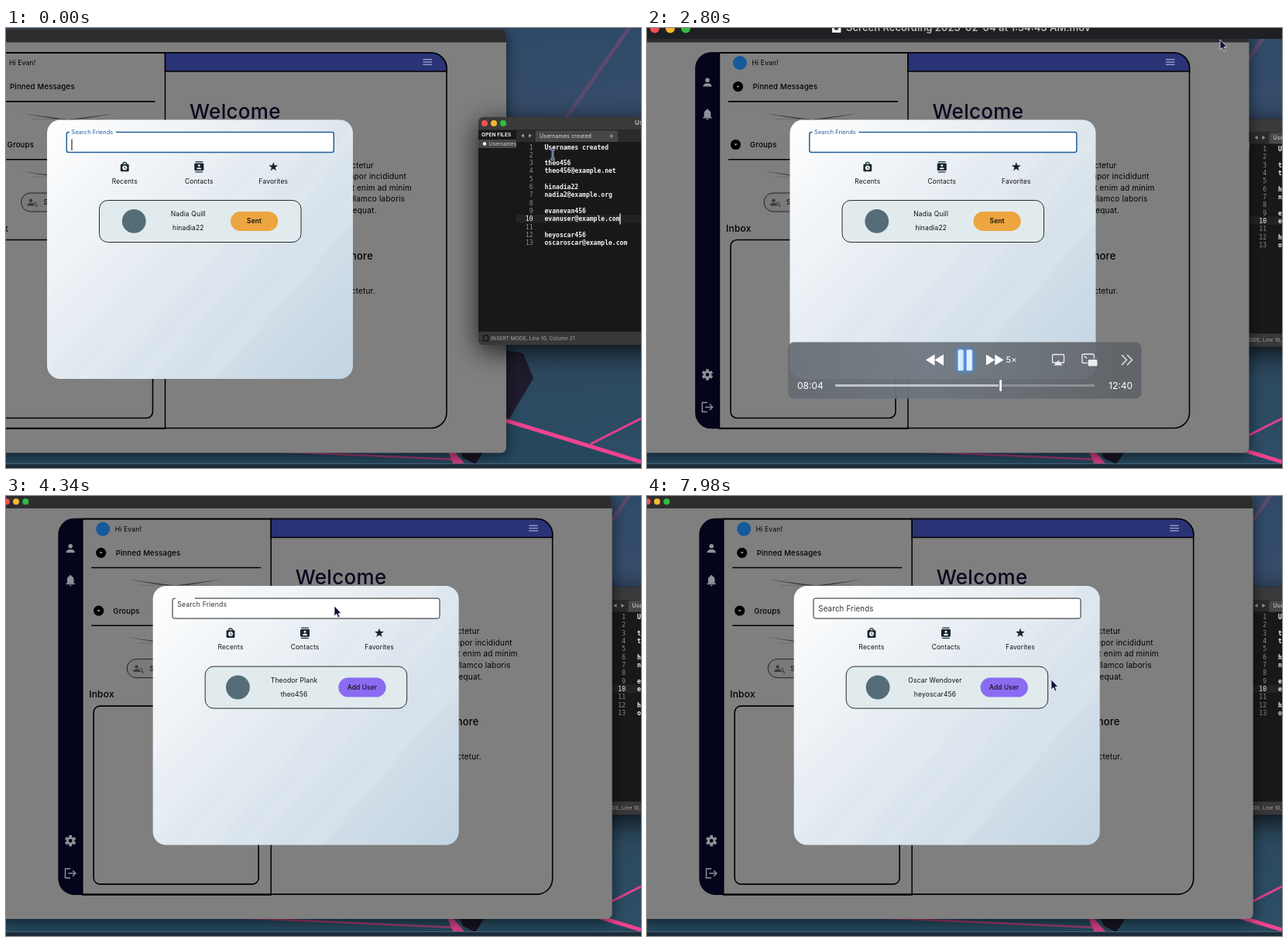
An HTML page with a canvas for the animation above (8000 ms loop, 820 by 568 pixels).

```html
<!DOCTYPE html>
<html lang="en">
<head>
<meta charset="utf-8">
<title>Friend search recording</title>
<style>
html, body { margin: 0; width: 100%; height: 100%; overflow: hidden; background: #2d475f; }
canvas { display: block; }
</style>
</head>
<body>
<canvas id="stage" width="820" height="568"></canvas>
<script>
const c = document.getElementById('stage').getContext('2d');
const LOOP = 8000, STEP = 70;
const UI = 'Inter, Roboto, sans-serif', MONO = '"DejaVu Sans Mono", monospace';
const LIGHTS = ['#f8504d', '#f5b731', '#2fbe43'];

const NADIA = { name: 'Nadia Quill', id: 'hinadia22' };
const THEO = { name: 'Theodor Plank', id: 'theo456' };
const OSCAR = { name: 'Oscar Wendover', id: 'heyoscar456' };

// Each search: field focus, first key, enter, press on "Add User"
const SEARCHES = [
  { user: THEO, focus: -500, type: 3600, enter: 4270, send: 4690 },
  { user: NADIA, focus: 5110, type: 5410, enter: 5950, send: 6510 },
  { user: OSCAR, focus: 6930, type: 7070, enter: 7770, send: Infinity }
];
const NOTES = ['Usernames created', '', THEO.id, 'theo456@example.net', '', NADIA.id, 'nadia2@example.org', '',
  'evanevan456', 'evanuser@example.com', '', OSCAR.id, 'oscaroscar@example.com'];

// Moves: start time, end time, x, y
const GRIP = [608.5, 15], FIELD = [297, 149], BUTTON = [462, 247];
const DRAG = [[2380, 2800, 131.5, 0], [2800, 3080, 146, -17.5], [3080, 3290, 136.7, -2.4]];
const POINTER = [
  [770, 1330, 612, 135], [1400, 1610, 731.5, 137.5], [1610, 2310, ...GRIP],
  ...DRAG.map(([a, b, x, y]) => [a, b, GRIP[0] + x, GRIP[1] + y]),
  [3290, 3500, 424, 142],
  ...SEARCHES.slice(0, 2).flatMap(({ enter, send }, i) =>
    [[enter + 70, send - 70, ...BUTTON], [send + 70, SEARCHES[i + 1].focus, ...FIELD]]),
  [7700, 7980, 522, 237]
];

const clamp = v => Math.max(0, Math.min(1, v));
const span = (t, a, b) => clamp((t - a) / (b - a));
const ease = u => u * u * (3 - 2 * u);

function glide(t, [x, y], moves) {
  for (const [a, b, toX, toY] of moves) {
    const k = ease(span(t, a, b));
    x += (toX - x) * k;
    y += (toY - y) * k;
  }
  return [x, y];
}

function paint(fill, stroke, width = 1) {
  if (fill) { c.fillStyle = fill; c.fill(); }
  if (stroke) { c.strokeStyle = stroke; c.lineWidth = width; c.stroke(); }
}
function box(x, y, w, h, r, fill, stroke, width) {
  c.beginPath(); c.roundRect(x, y, w, h, r); paint(fill, stroke, width);
}
function disc(x, y, r, fill, stroke, width) {
  c.beginPath(); c.arc(x, y, r, 0, 7); paint(fill, stroke, width);
}
function poly(points, fill, stroke, width) {
  c.beginPath();
  for (let i = 0; i < points.length; i += 2) c.lineTo(points[i], points[i + 1]);
  if (fill) c.closePath();
  paint(fill, stroke, width);
}
function line(x1, y1, x2, y2, color, width) {
  poly([x1, y1, x2, y2], null, color, width);
}
function text(s, x, y, size, color, { weight = 400, align = 'left', font = UI, gap = .018 } = {}) {
  c.font = `${weight} ${size}px ${font}`;
  c.letterSpacing = size * gap + 'px';
  c.textAlign = align;
  c.fillStyle = color;
  c.fillText(s, x, y + size * .36);
}
function shadow(blur, alpha, y = 0) {
  c.shadowBlur = blur; c.shadowColor = `rgba(0,0,0,${alpha})`; c.shadowOffsetY = y;
}
function at(x, y, scale, drawing) {
  c.save(); c.translate(x, y); c.scale(scale, scale); drawing(); c.restore();
}
const lights = (x, y, gap, r) => LIGHTS.forEach((color, i) => disc(x + gap * i, y, r, color));

// Icons are drawn around 0,0 about 20 units wide
const person = color => () => {
  disc(0, -4, 4, color);
  box(-8, 2, 16, 6, [7, 7, 0, 0], color);
};
const bell = color => () => {
  box(-6, -8, 12, 13, [6, 6, 0, 0], color);
  box(-8, 5, 16, 2, 0, color);
  disc(0, -8, 1.7, color);
  box(-2, 8, 4, 2, [0, 0, 2, 2], color);
};
const logout = color => () => {
  poly([0, -8, -9, -8, -9, 8, 0, 8], null, color, 2);
  line(-4, 0, 8, 0, color, 2);
  poly([4, -5, 9, 0, 4, 5], null, color, 2);
};
const gear = color => () => {
  disc(0, 0, 5.2, null, color, 4);
  for (let i = 0; i < 6; i++) {
    c.rotate(Math.PI / 3);
    box(-2.5, -9.8, 5, 4, .5, color);
  }
};
const recents = color => () => {
  box(-4, -10, 8, 8, 4, null, color, 2);
  box(-9, -6, 18, 16, 2, color);
  disc(0, 2, 5, '#f3f6f8');
  poly([0, -1, 0, 2.3, 2.4, 4], null, color, 1.6);
};
const contacts = color => () => {
  box(-8, -12, 16, 2, 0, color);
  box(-8, 10, 16, 2, 0, color);
  box(-10, -8, 20, 16, 2, color);
  disc(0, -2.8, 2.4, '#f3f6f8');
  box(-5, 1.5, 10, 3.5, [4, 4, 0, 0], '#f3f6f8');
};
const star = color => () => {
  const points = [];
  for (let i = 0; i < 10; i++) {
    const r = i % 2 ? 4.2 : 10.4, a = i * Math.PI / 5;
    points.push(r * Math.sin(a), -r * Math.cos(a));
  }
  poly(points, color);
};

function desktop() {
  const g = c.createLinearGradient(700, 0, 760, 568);
  g.addColorStop(0, '#2e4a68'); g.addColorStop(.25, '#384d6c');
  g.addColorStop(.72, '#2b475c'); g.addColorStop(1, '#2d4e66');
  box(0, 0, 820, 568, 0, g);
  line(808, -5, 722, 118, '#5b4a6e', 5);
  poly([640, 415, 668, 420, 681, 452, 646, 511], '#201b2d');
  poly([0, 520, 646, 508, 820, 560, 820, 568, 0, 568], '#25485d');
  line(0, 531, 580, 557, '#a03a72', 2.5);
  line(755, 537, 820, 504, '#e0418b', 3);
  line(640, 505, 820, 560, '#f0438f', 5);
  poly([564, 530, 578, 564, 592, 562], '#d53f83');
  poly([580, 530, 628, 530, 606, 563, 590, 555], '#17131f');
}

function editor() {
  shadow(34, .8, 8);
  box(610, 115, 330, 294, 7, '#181818');
  shadow(0, 0);
  box(610, 115, 330, 16.5, [7, 7, 0, 0], '#3a3a3c');
  lights(618, 123, 12, 4);
  text('Usernames created', 812, 122.5, 8, '#c4c4c4', { weight: 600 });
  box(659, 131.5, 290, 15.5, 0, '#2b2b2c');
  box(684, 132.5, 106, 14.5, [3, 3, 0, 0], '#474748');
  for (const side of [-1, 1]) {
    const x = 672 + side * 3;
    poly([x, 136.5, x, 141.5, x + side * 4, 139], '#999');
  }
  text('Usernames created', 689, 139.3, 7, '#ddd');
  disc(782, 139.5, 2, '#888');
  text('OPEN FILES', 614, 137.6, 6.5, '#eee', { weight: 700 });
  box(610, 144, 49, 11, 0, '#454546');
  disc(618, 149.5, 2.2, '#fff');
  text('Usernames', 623.5, 149.5, 6.6, '#ccc', { gap: 0 });
  box(659, 241, 290, 10.4, 0, '#232323');
  NOTES.forEach((note, i) => {
    const y = 153.6 + i * 10.33, mono = { font: MONO, gap: 0 };
    text(i + 1, 680.5, y, 8.07, i == 9 ? '#fff' : '#8d8d8a', { ...mono, align: 'right' });
    text(note, 695.5, y, 8.07, '#f4f4f4', { ...mono, weight: 700 });
  });
  box(792.4, 239.5, 1.2, 14, 0, '#fff');
  box(610, 392, 330, 17, [0, 0, 7, 7], '#38383a');
  box(616.5, 397, 6, 7, 1, null, '#151515', 1.5);
  text('INSERT MODE, Line 10, Column 21', 626, 400.5, 6.5, '#aaa');
}

function section(label, x, y, labelX) {
  disc(x, y, 6.6, '#000');
  poly([x - 2.2, y - 1, x + 2.2, y - 1, x, y + 1.4], '#999');
  text(label, labelX, y, 9.6, '#000', { weight: 500 });
  line(-26.5, y + 19.2, 192.5, y + 19.2, '#000', 1.6);
  for (const side of [-1, 1]) {
    poly([81 + side * 61, y + 34.5, 81 + side * 2, y + 42, 81, y + 44.5], '#383838');
  }
  line(34, y + 42, 128, y + 42, '#686868', .8);
}

function sidePanel() {
  const pale = '#909097';
  box(-68.5, 31.5, 31, 485.5, [20, 0, 0, 20], '#04041d');
  at(-53.5, 70, .7, person(pale));
  at(-53.5, 111.5, .72, bell(pale));
  at(-53.5, 447.5, .74, gear(pale));
  at(-53.5, 489.5, .74, logout(pale));
  box(-38, 32, 243.5, 485.3, 0, null, '#000', 1.5);
  disc(-11.5, 45, 9, '#155a9b');
  text('Hi Evan!', 4, 45, 8.6, '#000');
  section('Pinned Messages', -14, 75.7, 5);
  section('Groups', -17, 150.5, 1.6);
  box(19.5, 213, 140, 24, 12, '#7a7a7a', '#222');
  at(32, 225, .55, person('#3a3a3a'));
  disc(37.5, 227, 2, '#7a7a7a', '#3a3a3a');
  line(39, 228.5, 41, 231, '#3a3a3a', 1.2);
  text('Search', 48.5, 225, 9, '#111', { weight: 500 });
  text('Inbox', -29.5, 258.5, 12, '#000', { weight: 500 });
  box(-23.5, 273.5, 213, 230, 8, null, '#000', 1.6);
}

function page() {
  shadow(18, .6, 3);
  box(-145, 1.5, 791, 547, 7, '#7f7f7f');
  shadow(0, 0);
  box(-145, 1.5, 791, 17, [7, 7, 0, 0], '#2d2d2f');
  lights(-136, 9.7, 12.3, 4);
  box(-68.5, 32, 637.5, 484.5, 20, null, '#000', 1.6);
  sidePanel();
  box(205.5, 32, 363.5, 24, [0, 20, 0, 0], '#293376', '#000', 1.5);
  for (let i = 0; i < 3; i++) box(538.5, 40 + i * 3.3, 11.5, 1.3, 0, '#a1a5c9');
  text('Welcome', 237, 107.2, 26, '#080820', { weight: 500, gap: .012 });
  const right = { align: 'right' };
  [['amet, consectetur', 475], ['eiusmod tempor incididunt', 517], ['aliqua. Ut enim ad minim', 524],
    ['nostrud exercitation ullamco laboris', 515], ['ea commodo consequat.', 478.5]]
    .forEach(([s, x], i) => text(s, x, 177 + i * 14.6, 10, '#000', right));
  text('Learn more', 474, 294, 13, '#000', { ...right, weight: 500 });
  text('amet, consectetur.', 477, 339, 10, '#000', right);
}

function searchField(t) {
  const { user, focus, type, enter } = SEARCHES.filter(s => t >= s.focus).pop();
  const focused = t < enter;
  const lift = focused ? span(t, focus - 70, focus + 50) : 1 - span(t, enter, enter + 120);
  const pace = (enter - 70 - type) / user.id.length;
  const typed = focused ? user.id.slice(0, Math.max(0, Math.ceil((t - type) / pace))) : '';
  const blue = '#235f99';
  box(78.3, 134.5, 345, 26, 2.5, '#fff', focused ? blue : '#222', focused ? 1.5 : 1);
  if (lift > 0) box(82, 133, 60 * lift, 3, 0, '#f9fbfc');
  if (!typed || lift > .9) {
    text('Search Friends', 84.6, 147.7 - 13.6 * lift, 9.7 - 2.4 * lift, focused ? blue : '#333');
  }
  text(typed, 84.7, 151.8, 9.7, '#000');
  if (focused && (t < 280 || t > 3300)) box(84.5 + c.measureText(typed).width, 143.5, 1, 14.5, 0, '#000');
}

function resultRow(t) {
  const last = SEARCHES.filter(s => t >= s.enter).pop() || { user: NADIA, send: 0 };
  const { name, id } = last.user, sent = t >= last.send, mid = { align: 'center' };
  // Longer names push the avatar and the button outwards
  const push = (name.length - 11) * 1.3;
  const left = 290 + push;
  box(120.5, 222.5, 260.5, 54, 11, '#e1ebed', '#2a2a2a');
  disc(165.3 - push, 249.4, 15.4, '#546d78');
  text(name, 235.3, 240.3, 8.5, '#111', mid);
  text(id, 235.3, 258.3, 8.5, '#111', mid);
  box(left, 237, 61.3, 25, 12.5, sent ? '#eda53f' : '#8a6cf3');
  text(sent ? 'Sent' : 'Add User', left + 30.6, 249.4, 8.4, '#111', { ...mid, weight: sent ? 600 : 500 });
}

function dialog(t) {
  const g = c.createLinearGradient(68, 104, 433, 468);
  g.addColorStop(0, '#ffffff'); g.addColorStop(.5, '#e0e8ef'); g.addColorStop(1, '#c2d4e2');
  box(53, 118.5, 395, 334.5, 17, g);
  c.save();
  c.clip();
  for (let i = 0; i < 5; i++) {
    const x = i * 75 - 60, w = 22 + i % 3 * 10;
    poly([x, 453, x + w, 453, x + w + 290, 118, x + 290, 118], 'rgba(255,255,255,.08)');
  }
  c.restore();
  searchField(t);
  [[recents, 'Recents'], [contacts, 'Contacts'], [star, 'Favorites']].forEach(([icon, label], i) => {
    const x = 153.3 + i * 96;
    at(x, 179.3, .6, icon('#15252f'));
    text(label, x, 197.5, 8.4, '#111', { align: 'center' });
  });
  resultRow(t);
}

function arrow() {
  poly([0, 0, 0, 13, 2.9, 10.3, 5, 15, 7, 14.1, 5, 9.6, 8.8, 9.4], '#0c0f30', '#e6e9f3', .8);
}
function beam() {
  for (const [color, width] of [['#d5dcf0', 2.6], ['#26345e', 1.1]]) {
    line(0, -6, 0, 6, color, width);
    for (const y of [-6.5, 6.5]) line(-3, y, 3, y, color, width);
  }
}
function resizer() {
  for (const [color, width] of [['#fff', 3.4], ['#111', 1.5]]) {
    line(-7, 0, 7, 0, color, width);
    for (const s of [-1, 1]) poly([s * 3, -4, s * 7, 0, s * 3, 4], null, color, width);
  }
}

function skip(x, y, dir, w) {
  for (const k of [0, 1]) {
    const a = x + dir * k * w;
    poly([a, y - w * .63, a + dir * w, y, a, y + w * .63], '#fff');
  }
}

function player(t) {
  const fast = t >= 1890, pale = '#ececee', plain = { gap: 0 };
  const clock = 479.3 + (t < 1890 ? (t - 1400) * 2 : 980 + (t - 1890) * 5) / 1000;
  const pad = n => String(Math.floor(n)).padStart(2, '0');
  c.globalAlpha = Math.min(span(t, 210, 490), 1 - span(t, 3290, 3570));
  box(0, 0, 820, 14, 0, '#1f2024');
  lights(10, .5, 20, 6);
  box(239, -7, 11.5, 13, 1, '#f2f2f2');
  disc(244.5, 0, 2.8, '#333');
  text('Screen Recording 2023-02-04 at 1:54:43 AM.mov', 257, -.5, 13, '#b9b9bc', { ...plain, weight: 600 });

  const g = c.createLinearGradient(182, 0, 638, 0);
  g.addColorStop(0, 'rgba(100,106,113,.92)'); g.addColorStop(.4, 'rgba(108,117,125,.92)');
  g.addColorStop(1, 'rgba(94,97,102,.92)');
  box(182, 405.5, 456.5, 73, 8, g);
  skip(383, 428.5, -1, 11.5);
  c.shadowColor = '#3f8cf5'; c.shadowBlur = 7;
  for (const x of [401.2, 412.2]) box(x, 415, 8, 27.5, 2, '#fff', '#65a5f5', 1);
  c.shadowBlur = 0;
  skip(fast ? 438 : 440.5, 428.5, 1, fast ? 11.3 : 8.6);
  if (t >= 840) text(fast ? '5×' : '2×', 463.5, 428.5, 11, '#fff');
  box(523.5, 421.5, 15, 10.5, 1, null, pale, 1.3);
  poly([525.5, 435.5, 536.5, 435.5, 531, 429], pale);
  box(561.8, 421, 15.5, 11.5, 2, null, pale, 1.3);
  box(569, 427.5, 13, 9.5, 2, pale, '#62666c', 1);
  line(564.5, 423.5, 568, 426.5, pale, 1.3);
  for (const x of [613, 620]) poly([x, 422, x + 6.5, 428.5, x, 435], null, pale, 1.4);
  text(pad(clock / 60) + ':' + pad(clock % 60), 194, 461.5, 12, '#fff', plain);
  text('12:40', 627, 461.5, 12, '#fff', { ...plain, align: 'right' });
  const x = 243 + 335 * clock / 760;
  box(243, 460, 335, 3, 1.5, '#8d9196');
  box(243, 460, x - 243, 3, 1.5, '#c3c6ca');
  box(x - 2, 453.5, 4, 16, 2, '#fff', '#5c6167');
  c.globalAlpha = 1;
}

function draw(t) {
  const win = glide(t, [0, 0], DRAG);
  const side = glide(t, [0, 0], [[1400, 1610, 119.5, 2.5]]);
  const raised = t >= DRAG[0][0];
  desktop();
  if (raised) at(...side, 1, editor);
  at(...win, 1, () => { page(); dialog(t); });
  if (!raised) at(...side, 1, editor);
  at(...glide(t, [706, 163], POINTER), 1, t < 1260 ? beam : t < 1680 ? resizer : arrow);
  box(0, 562, 820, 1, 0, '#4b6377');
  box(0, 563, 820, 5, 0, '#1c2c3a');
  player(t);
}

const start = performance.now();
function tick() {
  const t = (performance.now() - start) % LOOP;
  draw(Math.floor(t / STEP) * STEP);
  requestAnimationFrame(tick);
}
tick();
</script>
</body>
</html>
```
